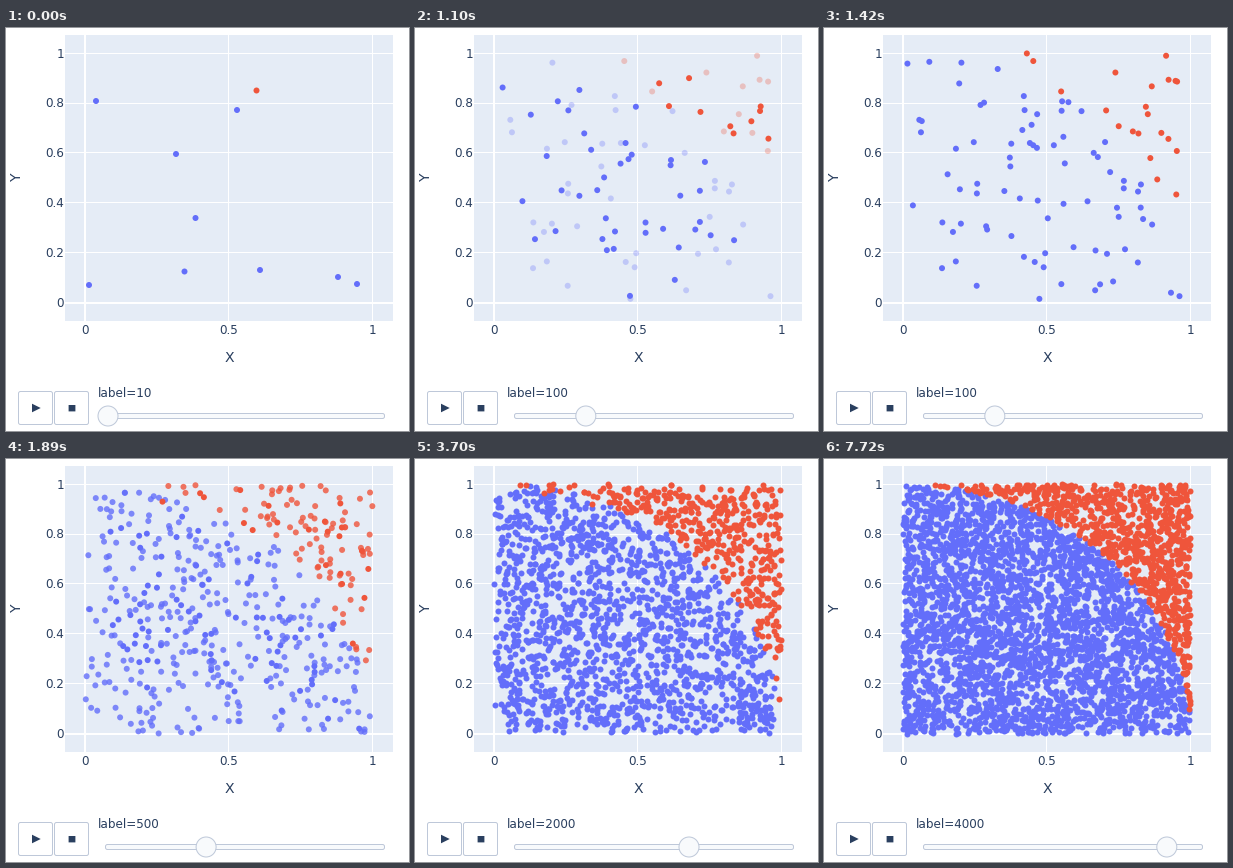
A matplotlib script that plays this animation: 403 px wide and 403 px high, repeating every 8 s.

```python
import numpy as np
import matplotlib.pyplot as plt
from matplotlib.animation import FuncAnimation
from matplotlib.colors import to_rgb
from matplotlib.patches import Circle, FancyBboxPatch, Polygon, Rectangle

SIZE, DPI = 403, 64
PT = 72 / DPI  # points per pixel
LOOP, STEP = 8000, 20
BLUE, RED, INK = "#636efa", "#ef553b", "#2a3f5f"
PLOT_BG, BORDER, PALE = "#e5ecf6", "#bec8d9", "#f8fafc"
X0, Y0, W, H = 79, 274.6, 287.5, 249.4  # data origin and unit lengths, pixels

COUNTS = [10, 50, 100, 500, 1000, 2000, 3000, 4000]
STARTS = [0, 500, 890, 1830, 2490, 3700, 5290, 7720]
# level: (span ms, progress from, to); the rest are shown complete
MOVES = {1: (390, 0, 1), 2: (530, 0, 1), 3: (90, 0.55, 0.85),
         4: (0, 0.84, 0.84), 5: (0, 0.95, 0.95)}

FIRST_BLUE = [(83, 257), (90, 73), (170, 126), (231, 82), (189.5, 190),
              (178.5, 243.5), (254, 242), (332, 249), (351, 256)]
FIRST_RED = [(250, 62)]

plt.rcParams["font.family"] = "DejaVu Sans"
rng = np.random.default_rng(7)


def sample(n):
    """Uniform points split by the quarter circle, in pixels."""
    n_blue = int(np.ceil(n * np.pi / 4))
    p = rng.random((n * 2 + 100, 2))
    inside = (p ** 2).sum(1) < 1
    px = np.column_stack([X0 + W * p[:, 0], Y0 - H * p[:, 1]])
    return px[inside][:n_blue], px[~inside][:n - n_blue]


SETS = [(np.array(FIRST_BLUE), np.array(FIRST_RED))]
SETS += [sample(n) for n in COUNTS[1:]]


def ease(u):
    u = min(max(u, 0), 1)
    return 4 * u ** 3 if u < 0.5 else 1 - 4 * (1 - u) ** 3


def grip_x(level):
    return 102 + 34.4 * level


fig = plt.figure(figsize=(SIZE / DPI, SIZE / DPI), dpi=DPI, facecolor="white")
ax = fig.add_axes([0, 0, 1, 1])
ax.set(xlim=(0, SIZE), ylim=(SIZE, 0))
ax.axis("off")


def text(x, y, s, size=12, ha="center", **kw):
    return ax.text(x, y, s, fontsize=size * PT, color=INK, ha=ha,
                   va="baseline", **kw)


def box(x, y, w, h, fill):
    ax.add_patch(FancyBboxPatch((x, y), w, h, fc=fill, ec=BORDER, lw=PT,
                                boxstyle="round,pad=0,rounding_size=2"))


def bar(x, y, w, h, color, **kw):
    ax.add_patch(Rectangle((x, y), w, h, fc=color, lw=0, **kw))


def draw_static():
    bar(59, 7, 328, 286, PLOT_BG)
    for v in (0.5, 1):
        bar(int(X0 + W * v), 7, 1, 286, "white")
    for i in range(1, 6):
        bar(59, int(Y0 - H * i / 5), 328, 1, "white")
    bar(78, 7, 2, 286, "white")
    bar(59, 274, 328, 2, "white")

    for i in range(6):
        text(58, Y0 - H * i / 5 + 4.4, f"{i / 5:g}", ha="right")
    for v in (0, 0.5, 1):
        text(X0 + W * v, 306, f"{v:g}")
    text(223, 334, "X", 14)
    text(14.5, 149, "Y", 14, rotation=90, rotation_mode="anchor")

    for x in (12.5, 48.5):
        box(x, 363.5, 34, 33, "white")
    ax.add_patch(Polygon([(26, 375.7), (34.7, 380), (26, 384.3)], fc=INK, lw=0))
    bar(62.6, 377, 6.8, 6.4, INK, snap=False)
    box(99.5, 385.5, 279, 5, PALE)


draw_static()
label = text(92, 369, "", ha="left")
grip = ax.add_patch(Circle((grip_x(0), 388), 10, fc=PALE, ec=BORDER, lw=PT,
                           zorder=5))
dots = [ax.scatter([], [], s=(6 * PT) ** 2, lw=0, zorder=z) for z in (3, 4)]


def set_dots(art, color, old, new, e):
    """Shared points travel from old to new places, extra ones fade in."""
    k = len(old)
    pos = new.copy()
    pos[:k] = old + (new[:k] - old) * e
    art.set_offsets(pos)
    if e > 0.9 and len(new) > 300:
        art.set_facecolor(color)
        return
    rgba = np.ones((len(pos), 4))
    rgba[:, :3] = to_rgb(color)
    rgba[k:, 3] = e
    art.set_facecolor(rgba)


def update(i):
    t = i * STEP + STEP / 2
    n = sum(s <= t for s in STARTS) - 1
    label.set_text(f"label={COUNTS[n]}")

    level = 5 if n == 6 else n  # at 3000 only the label keeps up
    prev = max(level - 1, 0)
    span, lo, hi = MOVES.get(level, (0, 1, 1))
    age = t - STARTS[level]
    e = lo + (hi - lo) * ease(age / span if span else 1)
    for art, color, old, new in zip(dots, (BLUE, RED), SETS[prev], SETS[level]):
        set_dots(art, color, old, new, e)

    glide = min(span, 150)
    g = ease(age / glide) if glide else 1
    grip.center = grip_x(prev + (level - prev) * g), 388
    return [*dots, grip, label]


anim = FuncAnimation(fig, update, frames=LOOP // STEP, interval=STEP,
                     repeat=True, repeat_delay=0, blit=False)
plt.show()
```
